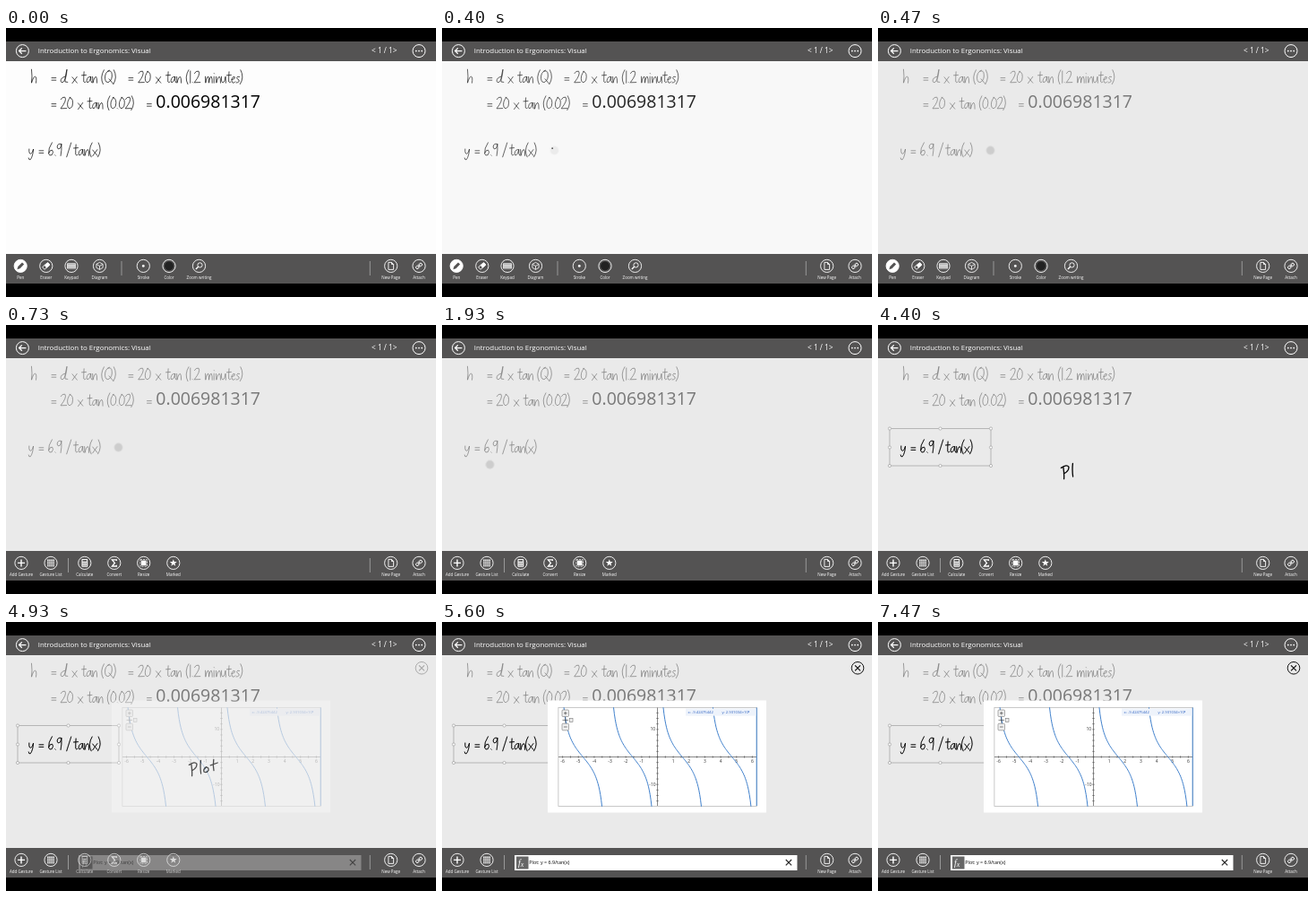
An HTML page for the animation above (8 s loop, 480 px wide and 300 px high).

```html
<!DOCTYPE html>
<html lang="en">
<head>
<meta charset="utf-8">
<title>Whiteboard plot</title>
<style>
html, body { margin: 0; width: 100%; height: 100%; overflow: hidden; background: #000; }
svg { display: block; width: 480px; height: 300px; font-family: "Open Sans", "Noto Sans", sans-serif; }
.ink { fill: none; stroke: #000; stroke-width: .7; stroke-linecap: round; stroke-linejoin: round; }
.icon { fill: none; stroke: #fff; stroke-width: .9; }
.icon text { fill: #fff; stroke: none; font-size: 4.5px; text-anchor: middle; }
.solid { fill: #fff; stroke: none; }
.dark { fill: #545353; stroke: none; }
.tick { font-size: 5px; fill: #333; text-anchor: middle; }
</style>
</head>
<body>
<svg id="stage" viewBox="0 0 480 300"></svg>
<script>
const LOOP = 8000;

// Pen glyphs: advance and strokes, baseline at 0
const GLYPHS = {
  'h': [8, 'M1-15Q2-7 1 0Q3-7 5-7T6 0'],
  '=': [7, 'M0-5.6h4.8M0-3h4.8'],
  'd': [9, 'M5.5-7Q.5-6 .6-2Q1 0 3-.6Q7-4 7.5-15Q5-5 5.5-1.2L8.3-.8'],
  'x': [6, 'M0-6.4L5.3 0M5.2-6.8L0 .4'],
  't': [5, 'M2.6-12.4Q2-4 2.3-1.2Q2.8.2 4.4-1M0-8.4L5-8.8'],
  'a': [6.6, 'M5.2-6.8Q1.2-7.4.6-2.6Q.6.2 2.4-.6Q4.6-2.4 5.2-6.8Q4.6-1.6 6.2-.2'],
  'n': [6, 'M.5-6.8L.9 0Q2.4-7 4.4-6.8Q5.6-6 5.5 0'],
  'm': [9, 'M.5-7L.8 0Q2-7 3.8-7Q4.6-6 4.5 0Q5.4-7 7.2-7Q8.4-5 8.2 0'],
  'i': [3, 'M1.2-7L1.2 0M1.3-10.6l.2.3'],
  'u': [6.4, 'M.5-7Q0 0 2.4-.2Q4.6-1.6 5-7L5.4 0'],
  'e': [5.2, 'M.5-3.6Q4.6-4 4-6.4Q2.4-8.2.8-4.6Q.2.2 2.4 0Q3.8-.3 4.6-1.4'],
  's': [4.8, 'M4-6.8Q1.6-8 1-5.6Q1.2-4.4 3.4-3.2Q4.4-.4.4-.2'],
  '(': [4, 'M3.4-14.4Q-1.6-6 2.4 1.4'],
  ')': [4, 'M.4-14.4Q4.8-6-.2 1.4'],
  'Q': [10.6, 'M5.4-14Q.2-12 .5-5Q1.2.6 5-1Q9-4 8.2-10Q7.6-14.6 3.6-13M5-4.4L9.6 1'],
  '2': [7.4, 'M.4-10.6Q2-13.8 5-13Q7.6-9.6.2-.4L6.8-.6'],
  '0': [7, 'M3.6-13Q-.8-8 .8-2.2Q2.8 1.6 5.8-3Q7.8-11.8 2.8-12.8'],
  '1': [3, 'M1.3-13.2L1.2 0'],
  '.': [2.5, 'M.8-.6l.4.4'],
  '6': [7, 'M4.4-14.6Q0-8 .6-2.2Q1.4.6 4.2-.8Q6.6-4 4.6-6.2Q2-6.8.8-3'],
  '9': [7, 'M5.2-13Q1-14.4.6-9.4Q1.4-6.4 3.6-8Q5.2-10 5.4-13Q5.8-6 4.6 0'],
  '/': [7, 'M5.2-14.4L.2 1.4'],
  'y': [7, 'M.8-7.4Q.4-2 2.6-2Q4.8-3.4 5.6-7.4Q5 1 2.2 4.4Q.4 5 .2 2.6'],
};

const write = (x, y, word) => [...word].map(c => {
  const [advance, d] = GLYPHS[c];
  const path = `<path d="${d}" transform="translate(${x.toFixed(1)} ${y})"/>`;
  x += advance;
  return path;
}).join('');
const line = (y, words) => words.map(([x, word]) => write(x, y, word)).join('');

const icon = (x, label, art) =>
  `<g class="icon" transform="translate(${x} 265.4)"><circle r="7.1"/>${art}` +
  `<text y="14.5">${label}</text></g>`;
const rule = x => `<path d="M${x} 260v16" stroke="#aaa" stroke-width=".8"/>`;
const range = (from, to) => Array.from({ length: to - from + 1 }, (_, i) => from + i);

const cells = (nx, ny, step, size, cls) => range(0, nx * ny - 1).map(i =>
  `<rect class="${cls}" x="${(i % nx - (nx - 1) / 2) * step - size / 2}" ` +
  `y="${(Math.floor(i / nx) - (ny - 1) / 2) * step - size / 2}" width="${size}" height="${size}"/>`).join('');
const star = 'M' + range(0, 9).map(i => {
  const r = i % 2 ? 1.7 : 4.2, a = i * Math.PI / 5;
  return `${(r * Math.sin(a)).toFixed(2)} ${(-r * Math.cos(a)).toFixed(2)}`;
}).join('L') + 'Z';

const penTools =
  icon(16.2, 'Pen', '<circle class="solid" r="7.1"/><path class="dark" d="M-3.8 3.8l1-3.2 4.6-4.6 2.2 2.2-4.6 4.6z"/>') +
  icon(44.8, 'Eraser', '<g transform="rotate(-40)"><rect x="-4" y="-1.8" width="8" height="3.6" rx=".8"/><rect class="solid" x="-1" y="-1.8" width="5" height="3.6"/></g>') +
  icon(73, 'Keypad', '<rect class="solid" x="-4.8" y="-3.2" width="9.6" height="6.4" rx=".6"/>' + cells(4, 3, 2, 1.1, 'dark')) +
  icon(104.5, 'Diagram', '<path stroke-width=".8" d="M0-4L3.6-2V2L0 4L-3.6 2V-2ZM-3.6-2L0 0L3.6-2M0 0V4"/>') +
  rule(129) +
  icon(153.3, 'Stroke', '<circle class="solid" r="1.4"/>') +
  icon(182, 'Color', '<circle r="5" fill="#222" stroke="none"/>') +
  icon(215.5, 'Zoom writing', '<circle cx="1" cy="-1" r="2.6"/><path stroke-width="1.4" d="M-.9.9L-3.6 3.6"/>');

const gestureTools =
  icon(17, 'Add Gesture', '<path stroke-width="1.4" d="M-4 0h8M0-4v8"/>') +
  icon(50, 'Gesture List', cells(4, 4, 2.1, 1.5, 'solid')) +
  rule(69.5);

const mathTools =
  icon(87.8, 'Calculate', '<rect class="solid" x="-3.3" y="-4.3" width="6.6" height="8.6" rx=".6"/><rect class="dark" x="-2.3" y="-3.4" width="4.6" height="1.6"/><g transform="translate(0 1.3)">' + cells(3, 3, 1.7, 1, 'dark') + '</g>') +
  icon(120.8, 'Convert', '<path stroke-width="1.3" d="M2.6-2.4V-3.6H-2.4L.6 0L-2.4 3.6H2.6V2.4"/>') +
  icon(153.7, 'Resize', '<rect class="solid" x="-2.8" y="-2.8" width="5.6" height="5.6"/><rect stroke-width=".8" stroke-dasharray="2 1.2" x="-3.8" y="-3.8" width="7.6" height="7.6"/>') +
  icon(186.8, 'Marked', `<path class="solid" d="${star}"/>`);

const pageTools = rule(406.3) +
  icon(429.7, 'New Page', '<path d="M-2.8-4H.8L2.9-1.9V4H-2.8ZM.8-4V-1.9H2.9"/>') +
  icon(461, 'Attach', '<g transform="rotate(-40)"><rect x="-4" y="-1.6" width="3.6" height="3.2" rx="1.5"/><rect x=".4" y="-1.6" width="3.6" height="3.2" rx="1.5"/><path d="M-1.8 0h3.6"/></g>');

const px = x => 240.5 + 17.65 * x;
const py = y => 150.5 - 3.07 * y;
const branch = k => 'M' + range(0, 48).map(i => {
  const x = k * Math.PI + .366 + i / 48 * (Math.PI - .732);
  return `${px(x).toFixed(2)} ${py(6.9 / Math.tan(x)).toFixed(2)}`;
}).join('L');
const ticks = range(-6, 6).filter(Boolean);

const graph = `
  <rect x="118" y="87.5" width="244" height="125" fill="#fff"/>
  <rect x="129.9" y="95.4" width="221.5" height="110" fill="#fff" stroke="#bbb" stroke-width=".8"/>
  <path stroke="#555" stroke-width=".7" d="M130 150.5H351M240.5 95.5V205${
    range(-12, 12).map(i => `M${px(i / 2)} 149.3v2.4`).join('')}${
    range(-8, 8).map(i => `M239.3 ${py(i * 2)}h2.4`).join('')}"/>
  ${ticks.map(i => `<text class="tick" x="${px(i)}" y="157.4">${i}</text>`).join('')}
  <text class="tick" x="235.3" y="121.3">10</text><text class="tick" x="235" y="182.8">-10</text>
  <path fill="none" stroke="#3f80cc" stroke-width="1" d="${range(-2, 1).map(branch).join('')}M351.2 95.5V205"/>
  <rect x="272" y="96.6" width="78.4" height="8" fill="#eef3fb"/>
  <g fill="#2b5fc0" font-size="4.2"><text x="274.5" y="102">x: -9.42475442</text><text x="312.5" y="102">y: 2.931034×10⁸</text></g>
  <g fill="#eee" stroke="#777" stroke-width=".6">
    <rect x="134" y="98" width="7.5" height="7.5" rx="1"/><rect x="134" y="113.3" width="7.5" height="7.5" rx="1"/>
    <path fill="none" stroke="#333" d="M136 101.7h3.6M137.8 99.9v3.6M136 117h3.6M134.5 109.4h6.6M137.8 106.2v6.4"/>
    <rect x="142.6" y="107.6" width="3.4" height="4"/>
  </g>`;

const queryBar = `
  <rect x="81" y="260" width="315.5" height="17" fill="#fff"/>
  <rect x="83" y="261.5" width="13.5" height="14" fill="#666"/>
  <text x="85" y="271.5" font-size="10" font-style="italic" fill="#fff" font-family="Liberation Serif, serif">f<tspan font-size="8" dy="1.2">x</tspan></text>
  <text x="97.3" y="270.3" font-size="5.4">Plot: y = 6.9/tan(x)</text>
  <path d="M383.8 265l6.4 6.4m0-6.4l-6.4 6.4" stroke="#222" stroke-width="1.1"/>`;

const equation = line(142.4, [[25, 'y'], [37, '='], [47, '6.9'], [67.5, '/'], [75.5, 'tan'], [92.7, '(x'], [102.8, ')']]);
const handles = [[13, 115.5], [69.5, 115.5], [126, 115.5], [13, 136.5], [126, 136.5], [13, 157], [69.5, 157], [126, 157]]
  .map(([x, y]) => `<circle cx="${x}" cy="${y}" r="1.6" fill="#fff"/>`).join('');
const plotWord = [
  'M206.8 158.4Q208 166 207.6 171.6M204.4 159.4Q211 154.8 213 158.4Q213 163 207.4 165.8',
  'M217.4 154.4Q216.6 162 217.6 169',
  'M223.6 161.8Q220 163.6 221 167Q223.8 168.8 226 165.4Q226.4 161.8 223 161.8',
  'M231.8 153.4Q230.8 160 232 165.6M228.2 159.8L236.2 157',
];

document.getElementById('stage').innerHTML = `
  <rect width="480" height="300"/>
  <rect y="37" width="480" height="215" fill="#fdfdfd"/>
  <g class="ink">
    ${line(61.2, [[27.5, 'h'], [51, '='], [60.5, 'd'], [74, 'x'], [84.5, 'tan'], [106, '(Q'], [120, ')'], [137, '='], [147.5, '20'],
      [167.5, 'x'], [178.5, 'tan'], [200.5, '(1.2'], [222, 'minutes'], [261.5, ')']])}
    ${line(90.2, [[51, '='], [60.8, '20'], [80.5, 'x'], [91, 'tan'], [112.5, '(0.02'], [140, ')'], [157.5, '=']])}
    ${equation}
  </g>
  <text x="167.3" y="89" font-size="19.5">0.006981317</text>
  <circle id="speck" cx="123.2" cy="134.2" r=".9"/>
  <rect id="dim" y="37" width="480" height="215" fill="#dadada" fill-opacity=".55"/>
  <g id="selection">
    <g stroke="#a8a8a8" stroke-width=".8" fill="none"><rect x="13" y="115.5" width="113" height="41.5"/>${handles}</g>
    <g class="ink" style="stroke-width:.85">${equation}</g>
  </g>
  <circle id="dot" r="4.7" fill="#cdcdcd"/>
  <g id="plotWord" class="ink" style="stroke-width:1.3">${plotWord.map((d, i) => `<path id="letter${i}" d="${d}"/>`).join('')}</g>
  <rect y="15" width="480" height="22" fill="#545353"/>
  <rect y="252" width="480" height="33" fill="#545353"/>
  <g fill="#fff"><text x="35.7" y="28.2" font-size="7.9">Introduction to Ergonomics: Visual</text>
    <text x="408" y="28.4" font-size="8.3">&lt; 1 / 1&gt;</text></g>
  <g fill="none" stroke="#fff"><circle cx="18.4" cy="25.6" r="7"/><circle cx="461" cy="25.6" r="7"/>
    <path stroke-width="1.3" d="M22.4 25.6H14.8M17.8 22.4L14.6 25.6L17.8 28.8"/></g>
  ${[457.8, 461, 464.2].map(x => `<circle cx="${x}" cy="25.6" r=".9" fill="#fff"/>`).join('')}
  <g id="penTools">${penTools}</g>
  <g id="gestureTools">${gestureTools}</g>
  <g id="mathTools">${mathTools}</g>
  ${pageTools}
  <g id="result">
    ${graph}${queryBar}
    <g fill="none" stroke="#111"><circle cx="464" cy="51.3" r="6.8"/><path stroke-width="1.2" d="M461 48.3l6 6m0-6l-6 6"/></g>
  </g>`;

function play(id, frames) {
  document.getElementById(id).animate(frames, { duration: LOOP, iterations: Infinity });
}

// Opacity steps as [ms, value]; two steps at one time make a hard change
function fade(id, ...steps) {
  const all = [[0, steps[0][1]], ...steps, [LOOP, steps.at(-1)[1]]];
  play(id, all.map(([t, opacity]) => ({ offset: t / LOOP, opacity })));
}
const show = (id, t) => fade(id, [t, 0], [t, 1]);

fade('speck', [200, 0], [200, 1], [440, 1], [440, 0]);
fade('dim', [375, 0], [460, 1]);
fade('penTools', [500, 1], [730, 0]);
fade('gestureTools', [500, 0], [730, 1]);
fade('mathTools', [500, 0], [730, 1], [4760, 1], [5330, 0]);
show('selection', 2265);
plotWord.forEach((_, i) => show('letter' + i, 4325 + i * 66));
fade('result', [4760, 0], [5330, 1]);
fade('dot', [375, 0], [460, 1], [2465, 1], [2465, 0], [3190, 0], [3310, 1], [4130, 1], [4130, 0]);

// The finger circles the equation, then rests where the word is written
const at = (t, x, y) => ({ offset: t / LOOP, transform: `translate(${x}px, ${y}px)` });
const lasso = range(0, 36).map(i => {
  const a = i / 36 * 2 * Math.PI;
  return at(1350 + i / 36 * 850, 74.2 + 51.3 * Math.cos(a), 136.5 - 21 * Math.sin(a));
});
play('dot', [at(0, 125.5, 136.5), ...lasso, at(2800, 125.5, 136.5), at(2800, 202.5, 153.5), at(LOOP, 202.5, 153.5)]);
</script>
</body>
</html>
```
